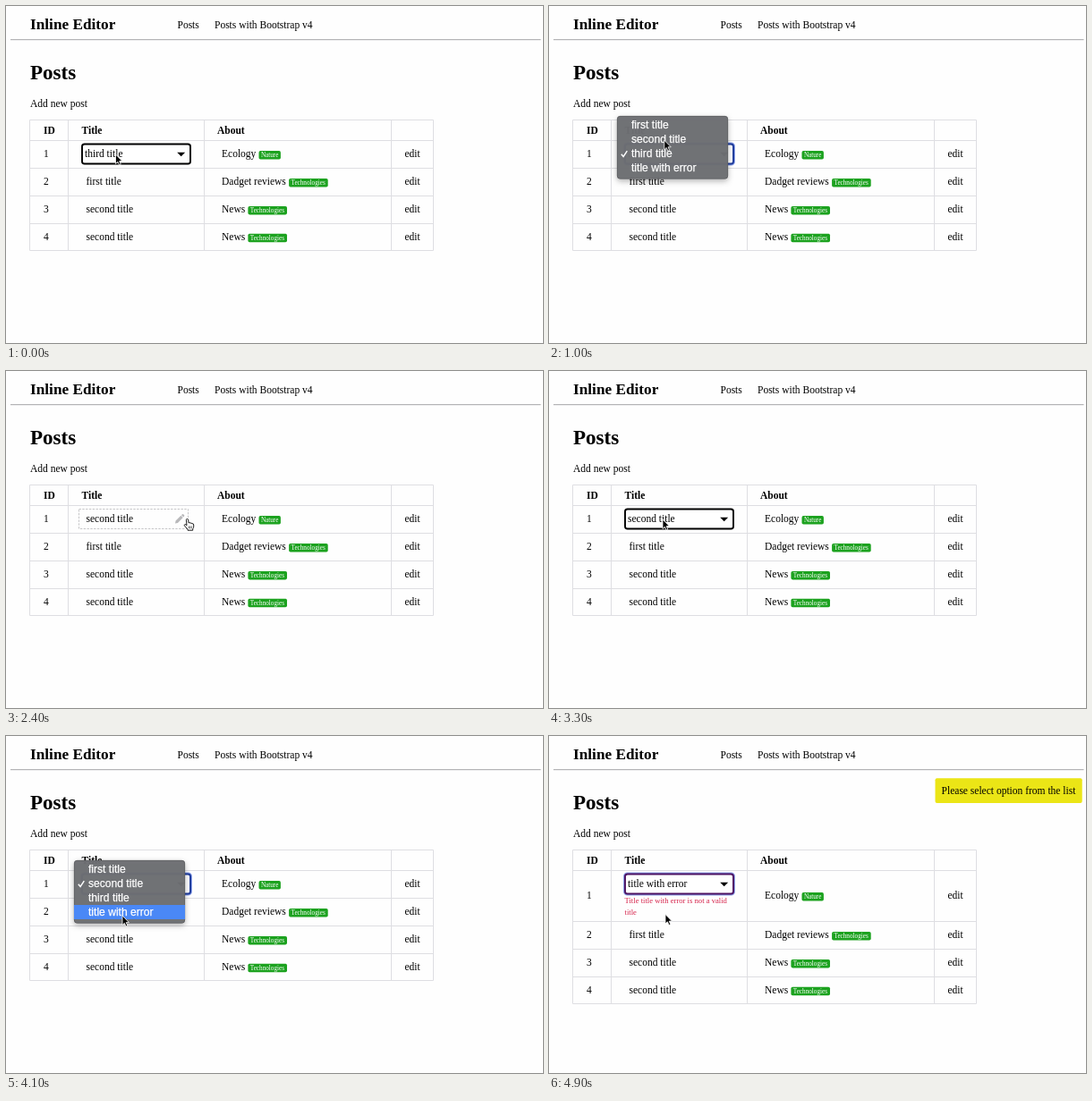
Animation of 600 by 377 pixels, one loop 5 s. Source, as an HTML page:

```html
<!DOCTYPE html>
<html lang="en">
<head>
<meta charset="utf-8">
<title>Inline Editor</title>
<style>
html, body { margin: 0; width: 100%; height: 100%; overflow: hidden; background: #fefefe; }
svg { display: block; width: 100vw; height: 100vh; }
text { font: 11.5px "Liberation Serif", "Times New Roman", serif; white-space: pre; }
.bold { font-weight: bold; }
.menu text { font: 12.1px "Liberation Sans", Arial, sans-serif; fill: #fff; stroke: #fff; stroke-width: .25; }
</style>
</head>
<body>
<svg id="stage" viewBox="0 0 600 377" preserveAspectRatio="none">
  <defs>
    <filter id="shade" x="-20%" y="-20%" width="140%" height="150%">
      <feDropShadow dx="0" dy="2.5" stdDeviation="3" flood-color="#000" flood-opacity=".3"/>
    </filter>
  </defs>
</svg>
<script>
const stage = document.getElementById('stage');
const LOOP = 5000, STEP = 100;
const titles = ['first title', 'second title', 'third title', 'title with error'];

function add(parent, tag, attrs = {}, content) {
  const el = document.createElementNS('http://www.w3.org/2000/svg', tag);
  for (const key in attrs) el.setAttribute(key, attrs[key]);
  if (content) el.textContent = content;
  parent.append(el);
  return el;
}
const group = (parent = stage, attrs) => add(parent, 'g', attrs);
const label = (parent, x, y, str, size = 11.5, fill = '#000', cls = '') =>
  add(parent, 'text', { x, y, fill, class: cls, style: `font-size:${size}px` }, str);
const box = (parent, x, y, width, height, attrs) =>
  add(parent, 'rect', { x, y, width, height, ...attrs });
const show = (el, on) => el.setAttribute('visibility', on ? 'visible' : 'hidden');
const move = (el, x, y) => el.setAttribute('transform', `translate(${x} ${y})`);
const clamp = v => Math.max(0, Math.min(1, v));

// page header
label(stage, 27, 25.5, 'Inline Editor', 17.25, '#000', 'bold');
label(stage, 191.5, 25, 'Posts');
label(stage, 233, 25, 'Posts with Bootstrap v4');
box(stage, 5, 37, 592.5, 1.2, { fill: '#b4b4b6' });
label(stage, 27, 81.5, 'Posts', 23, '#000', 'bold');
label(stage, 27, 113, 'Add new post');

// table
const grid = add(stage, 'path', { fill: 'none', stroke: '#dedee2' });
[[42, 'ID'], [84.5, 'Title'], [236, 'About']].forEach(([x, s]) => label(stage, x, 142.7, s, 11.5, '#000', 'bold'));

function makeRow(id, about, aboutWidth, tag, tagWidth) {
  const g = group();
  label(g, 42, 0, id);
  label(g, 241, 0, about);
  label(g, 445.5, 0, 'edit');
  const x = 241 + aboutWidth + 3.2;
  box(g, x, -7.3, tagWidth + 4.8, 9.5, { rx: 1.8, fill: '#1ca21f' });
  label(g, x + 2.4, -.3, tag, 7.2, '#fff');
  return g;
}
const rows = [
  makeRow('1', 'Ecology', 38.3, 'Nature', 19.6),
  makeRow('2', 'Dadget reviews', 71.9, 'Technologies', 38.8),
  makeRow('3', 'News', 26.2, 'Technologies', 38.8),
  makeRow('4', 'News', 26.2, 'Technologies', 38.8)
];
[null, 0, 1, 1].forEach((n, i) => n !== null && label(rows[i], 89.5, 0, titles[n]));

// hovered cell
const cell = group();
box(cell, 81.5, 154.5, 122, 22, { fill: 'none', stroke: '#c6c6c8', 'stroke-dasharray': '2.4 1.4' });
label(cell, 89.5, 169.4, titles[1]);
add(cell, 'path', {
  d: 'M189 170.5l.6-2.9 5.8-5.8 2.3 2.3-5.8 5.8zM196 161.2l.9-.9q.6-.5 1.2 0l1 1q.5.6 0 1.2l-.9.9z',
  fill: '#b9b9bb'
});

// select field
const field = group();
const glow = box(field, 84, 153.5, 123, 24, { rx: 3.5, fill: 'none', stroke: '#8fa3ea', 'stroke-width': 2 });
const frame = box(field, 85, 154.5, 121, 22, { rx: 2.8, fill: '#fff', 'stroke-width': 1.9 });
const value = label(field, 88, 169.4, '');
add(field, 'path', { d: 'M191.2 163.7h9l-4.5 4.6z' });

const error = group();
label(error, 84.5, 187, 'Title title with error is not a valid', 8.63, '#d6224a');
label(error, 84.5, 200, 'title', 8.63, '#d6224a');

// drop-down menu
const menu = group(stage, { class: 'menu' });
box(menu, 76, 0, 124, 70.5, { rx: 3.5, fill: '#6e6f73', 'fill-opacity': .97, filter: 'url(#shade)' });
box(menu, 76.3, .3, 123.4, 69.9, { rx: 3.3, fill: 'none', stroke: '#58595c', 'stroke-width': .6 });
const bar = box(menu, 76, 0, 124, 16, { fill: '#4a88f6' });
titles.forEach((s, i) => label(menu, 92, 14.4 + 16 * i, s, 12.1, '#fff'));
const tick = add(menu, 'path', {
  d: 'M80.8 .3l2.3 2.7 4.2-6.4', fill: 'none', stroke: '#fff', 'stroke-width': 1.4
});

// notices
function makeToast(x, str, fill, ink) {
  const g = group();
  box(g, x, 47.3, 595.7 - x, 27.8, { rx: 2, fill });
  label(g, x + 7.1, 65, str, 11.5, ink);
  return g;
}
const success = makeToast(429, 'Record was successfully updated', '#228c46', '#fff');
const warning = makeToast(431.5, 'Please select option from the list', '#ebe516', '#000');

// pointers
const arrow = add(stage, 'path', {
  d: 'M0 0V10.5L2.4 8.3 4.1 12 5.8 11.2 4.2 7.6H7.4Z', stroke: '#fff', 'stroke-width': .8
});
const hand = group();
add(hand, 'path', {
  d: 'M-1.1 1Q-1.2 0 0 0 1 0 1.1 1L1.6 4.4Q2.8 3.6 3.5 4.7 4.7 4.1 5.3 5.2 7 4.9 7.2 6.4V8.6Q7.1 10.2 6.2 11.2V12.7H.5V11.7L-3 7.7Q-3.7 6.6-2.7 6.1-1.8 5.8-.5 7.2Z',
  fill: '#fff', stroke: '#000', 'stroke-width': .9, 'stroke-linejoin': 'round'
});
add(hand, 'path', { d: 'M1.6 8V10.8M3.2 8V10.8M4.8 8V10.8', stroke: '#000', 'stroke-width': .6 });

// pointer stops: time, x, y
const stops = [
  [0, 122.5, 166], [400, 122.5, 166], [800, 129, 150], [1300, 128.5, 150.5], [1900, 128.5, 150.5],
  [2300, 202.5, 165.5], [2600, 202.5, 165.5], [3000, 132, 165], [3100, 132, 165],
  [3300, 127, 166], [3600, 127, 166], [4000, 130, 201], [4300, 130, 201], [4600, 130, 199.5], [LOOP, 130, 199.5]
];
function pointerAt(t) {
  const i = stops.findIndex(s => s[0] > t);
  const [t0, x0, y0] = stops[i - 1], [t1, x1, y1] = stops[i];
  const k = (t - t0) / (t1 - t0), e = k * k * (3 - 2 * k);
  return [x0 + (x1 - x0) * e, y0 + (y1 - y0) * e];
}

function render(t) {
  const within = (a, b) => t >= a && t < b;
  const [px, py] = pointerAt(t);
  const hovering = within(1300, 2600);
  const failed = t >= 4500;
  const grow = failed ? 26 : 0;

  const ys = [127.5, 150.5, 181.5, 212.5, 243.5, 273.5].map((y, i) => y + (i > 1 ? grow : 0));
  grid.setAttribute('d', ys.map(y => `M26.5 ${y}H477.5`).join('') +
    [26.5, 69.5, 221.5, 430.5, 477.5].map(x => `M${x} 127.5V${ys[5]}`).join(''));
  rows.forEach((row, i) => move(row, 0, 169.4 + 30.9 * i + (i ? grow : grow / 2)));

  const first = within(300, 1200), second = within(3500, 4300);
  const open = first || second;
  show(cell, hovering);
  show(field, !hovering);
  show(error, failed);
  show(glow, failed || open);
  frame.setAttribute('stroke', failed ? '#4d1262' : open ? '#1d3a9c' : '#000');
  value.textContent = titles[t < 1200 ? 2 : t < 4300 ? 1 : 3];

  const chosen = first ? 2 : 1, top = 155 - 16 * chosen;
  const hover = Math.floor((py - top - 2) / 16);
  const blink = within(1000, 1100) || within(4200, 4300);
  show(menu, open);
  move(menu, 0, top);
  show(bar, open && !blink);
  bar.setAttribute('y', 2 + 16 * hover);
  move(tick, 0, 10.5 + 16 * chosen);

  success.setAttribute('opacity', t < 1300 ? 0 : 1 - clamp((t - 1900) / 400));
  warning.setAttribute('opacity', t < 4600 ? 0 : clamp((t - 4500) / 200));

  show(hand, hovering);
  show(arrow, !hovering);
  move(hovering ? hand : arrow, px, py);
}

const start = performance.now();
function tick60() {
  const t = (performance.now() - start) % LOOP;
  render(Math.floor(t / STEP) * STEP);
  requestAnimationFrame(tick60);
}
tick60();
</script>
</body>
</html>
```
